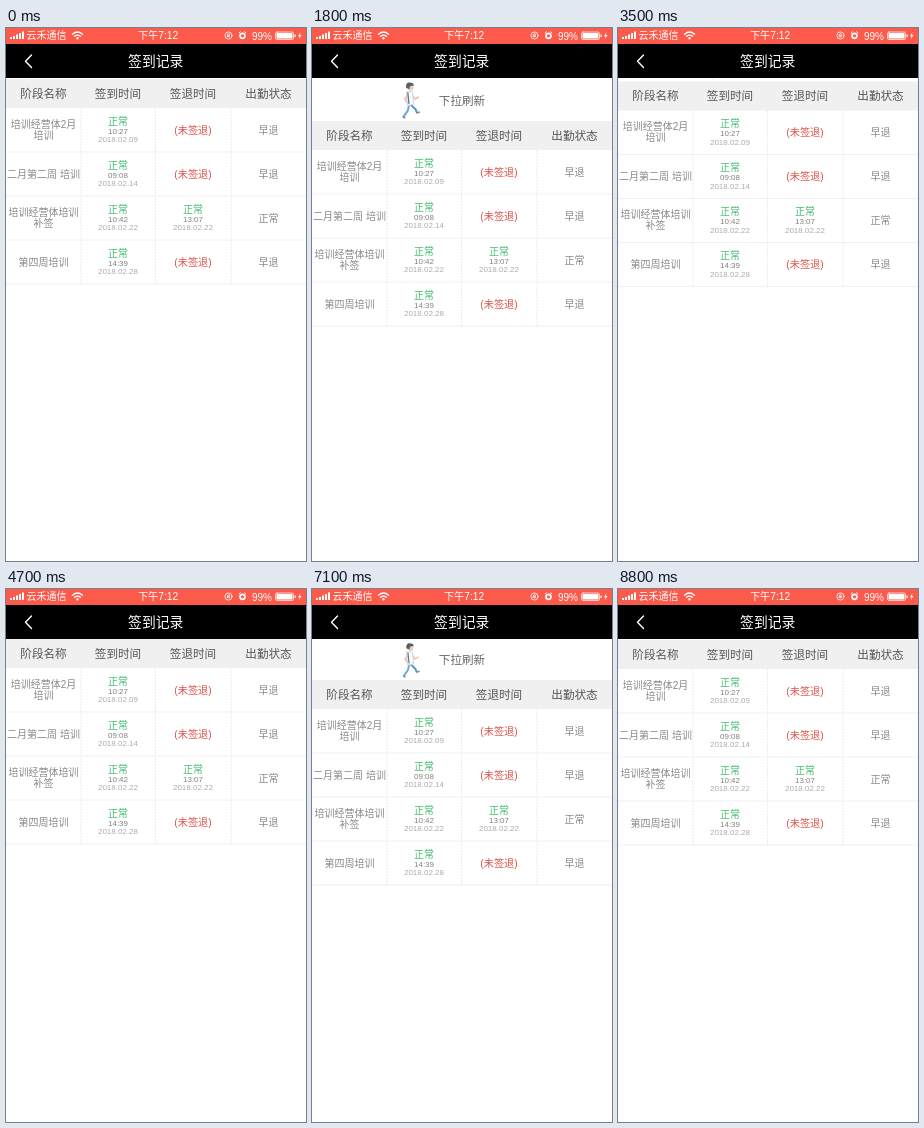
Recreate the animation shown at these times as an HTML page. Size 300x533 px, loop 8900 ms.

```html
<!DOCTYPE html>
<html lang="zh-CN">
<head>
<meta charset="utf-8">
<style>
html, body { margin: 0; height: 100%; overflow: hidden; background: #fff; }
svg { display: block; width: 100vw; height: 100vh; }
text { font-family: "Liberation Sans", "Noto Sans CJK SC", "Noto Sans CJK", sans-serif; text-anchor: middle; white-space: pre; }
.line { fill: none; stroke-linecap: round; stroke-linejoin: round; }
</style>
</head>
<body>
<svg viewBox="0 0 300 533">
  <g id="page">
    <g id="poseStride" class="line">
      <path d="M103 16v14M107 15v13" stroke="#eceef2" stroke-width=".8"/>
      <path d="M89 35l-3 4-7-1" stroke="#6ba6da" stroke-width="1.9"/>
      <path d="M91 35l5 4-4 6" stroke="#5b98d2" stroke-width="2"/>
      <path d="M79 38l-1-1.500M92 45.500l2.500 .5" stroke="#7588a8" stroke-width="1.500"/>
      <path d="M87 25l-4 4 2 4M92 25l4 4 5-2" stroke="#f0bdae" stroke-width="1.500"/>
      <path d="M86.500 22l5.500 0 2 12-6.500 1z" fill="#fafbfd" stroke="#c3cfe2" stroke-width=".8"/>
      <path d="M87 23l1.500 10" stroke="#6b7080" stroke-width="1.200"/>
      <circle cx="90.800" cy="18" r="2.600" fill="#f4cbbb"/>
      <path d="M86.500 18c-1-4 1.500-6 4.500-5 2 0 3 1.500 2.500 3-3-.5-4 0-4 3z" fill="#53635f"/>
    </g>
    <g id="poseStep" class="line">
      <path d="M97 35l-1 5-4 5.500" stroke="#6ba6da" stroke-width="1.900"/>
      <path d="M99.500 35l4 4 1 2.500" stroke="#5b98d2" stroke-width="2"/>
      <path d="M91.500 46l1.500 .8M104.500 42l2.500-.5" stroke="#7588a8" stroke-width="1.500"/>
      <path d="M96 25l-3 4 2 3M100 25l3 4 3-2" stroke="#f0bdae" stroke-width="1.500"/>
      <path d="M95 22l5.500 0 1 12-5.500 1z" fill="#fafbfd" stroke="#c3cfe2" stroke-width=".8"/>
      <path d="M96 23l1 10" stroke="#6b7080" stroke-width="1.200"/>
      <circle cx="98.600" cy="18.500" r="2.600" fill="#f4cbbb"/>
      <path d="M94.500 18.500c-1-4 1.500-6 4.500-5 2 0 3 1.500 2.500 3-3-.5-4 0-4 3z" fill="#53635f"/>
    </g>
    <rect y="50" width="300" height="29" fill="#f0f0f0"/>
  </g>
  <g id="bars">
    <rect width="300" height="50" fill="#000"/>
    <rect width="300" height="16" fill="#fc5a4b"/>
    <path d="M25.500 27l-6 6.300 6 6.300" class="line" stroke="#fff" stroke-width="1.400"/>
    <path d="M4 9h2v2h-2zM7 8h2v3h-2zM10 6.500h2v4.500h-2zM13 5h2v6h-2zM16 3.500h2v7.500h-2z" fill="#fff"/>
    <g class="line" stroke="#fff" stroke-width="1.400">
      <path d="M66.500 6.200q5-4.400 10 0M68.600 8.300q2.900-2.400 5.800 0"/>
      <circle cx="71.500" cy="10.300" r=".5"/>
      <g stroke-width="1">
        <circle cx="222.500" cy="7.500" r="3.600" stroke-width=".8"/>
        <path d="M221.500 7.700h2v1h-2zM221.700 7v-1q.8-1 1.600 0v1" stroke-width=".8"/>
        <circle cx="236.500" cy="7.800" r="2.500" stroke-width="1.700"/>
        <path d="M233.200 4.800l1.100-1M239.800 4.800l-1.100-1"/>
        <rect x="269.500" y="4" width="18" height="7.500" rx="1.500" stroke-width=".7"/>
      </g>
    </g>
    <rect x="270.500" y="5" width="16" height="5.500" rx=".8" fill="#fff"/>
    <path d="M288.500 6.500h1.200v2.500h-1.200zM294.500 4l-2.500 4.200h1.500l-.7 3 2.700-4.200h-1.600z" fill="#fff"/>
  </g>
</svg>
<script>
const NS = "http://www.w3.org/2000/svg";
const $ = id => document.getElementById(id);
const page = $("page"), bars = $("bars");

function add(parent, tag, attrs) {
  const el = document.createElementNS(NS, tag);
  for (const k in attrs) el.setAttribute(k, attrs[k]);
  return parent.appendChild(el);
}

// y is the vertical centre of the glyphs
function label(parent, str, x, y, size, fill, weight = 400) {
  const el = add(parent, "text", { x, y: y + size * 0.37, "font-size": size, fill, "font-weight": weight });
  el.textContent = str;
  return el;
}

label(bars, "云禾通信", 40.5, 7.5, 10, "#fff");
label(bars, "下午7:12", 152, 7.5, 10.2, "#fff", 500);
label(bars, "99%", 256, 7.8, 10, "#fff");
label(bars, "签到记录", 149.7, 33, 13.8, "#fff", 500);

const cols = [37.5, 112, 187, 262.5];
["阶段名称", "签到时间", "签退时间", "出勤状态"].forEach((s, i) =>
  label(page, s, cols[i], 64.5, 11.6, "#555"));

const rows = [
  [["培训经营体2月", "培训"], "10:27", "2018.02.09"],
  [["二月第二周 培训"], "09:08", "2018.02.14"],
  [["培训经营体培训", "补签"], "10:42", "2018.02.22", "13:07"],
  [["第四周培训"], "14:39", "2018.02.28"]
];

function stamp(x, mid, time, date) {
  label(page, "正常", x, mid - 8.7, 10, "#43bd70");
  label(page, time, x, mid + 1, 8, "#808080");
  label(page, date, x, mid + 9.6, 8, "#ababab");
}

rows.forEach(([name, time, date, out], i) => {
  const mid = 100.8 + 44 * i;
  name.forEach((s, k) =>
    label(page, s, cols[0], mid + (name.length > 1 ? k * 11 - 5.7 : 0), 10, "#888"));
  stamp(cols[1], mid, time, date);
  if (out) stamp(cols[2], mid, out, date);
  else label(page, "(未签退)", cols[2], mid, 10.2, "#dc5148");
  label(page, out ? "正常" : "早退", cols[3], mid, 10, "#888");
  add(page, "path", { d: `M0 ${mid + 22.2}H300`, stroke: "#f0f0f0" });
});
for (const x of [75, 149.5, 225])
  add(page, "path", { d: `M${x} 79V255`, stroke: "#ececec", "stroke-dasharray": "2 1" });

const pullText = label(page, "下拉刷新", 150, 30, 11.6, "#666");
const busyText = label(page, "努力奔跑中...", 149.5, 29, 11.6, "#666");

// pull distance: [ms, px]
const keys = [
  [0, 1], [600, 1], [900, 4], [1100, 8], [1800, 43], [2100, 60], [2150, 60], [2250, 53], [2400, 50],
  [3300, 50], [3350, 30], [3450, 6], [3550, 1], [3600, 0],
  [6500, 0], [6700, 12], [7100, 41], [7200, 48], [7300, 56], [7350, 57], [7450, 52], [7550, 50],
  [8550, 50], [8600, 30], [8700, 6], [8800, 1], [8900, 1]
];

function pullAt(t) {
  const i = keys.findIndex(k => k[0] > t);
  const [t0, a] = keys[i - 1], [t1, b] = keys[i];
  return a + (b - a) * (t - t0) / (t1 - t0);
}

const show = (el, on) => el.setAttribute("visibility", on ? "visible" : "hidden");

function draw(now) {
  const t = Math.floor(now % 8900 / 100) * 100;
  const pull = pullAt(t);
  const busy = t >= 2200 && t < 3600 || t >= 7400 && t < 8800;
  const stride = busy && Math.floor(t / 200) % 2 === 1;
  // the runner grows from its feet while the page is pulled
  const size = busy ? 1 : Math.min(pull, 50) / 41;
  page.setAttribute("transform", `translate(0 ${pull})`);
  $("poseStep").setAttribute("transform", `translate(99 47) scale(${size}) translate(-99 -47)`);
  show(pullText, !busy);
  show(busyText, busy);
  show($("poseStride"), stride);
  show($("poseStep"), !stride);
}

const start = performance.now();
function tick() {
  draw(performance.now() - start);
  requestAnimationFrame(tick);
}
tick();
</script>
</body>
</html>
```
